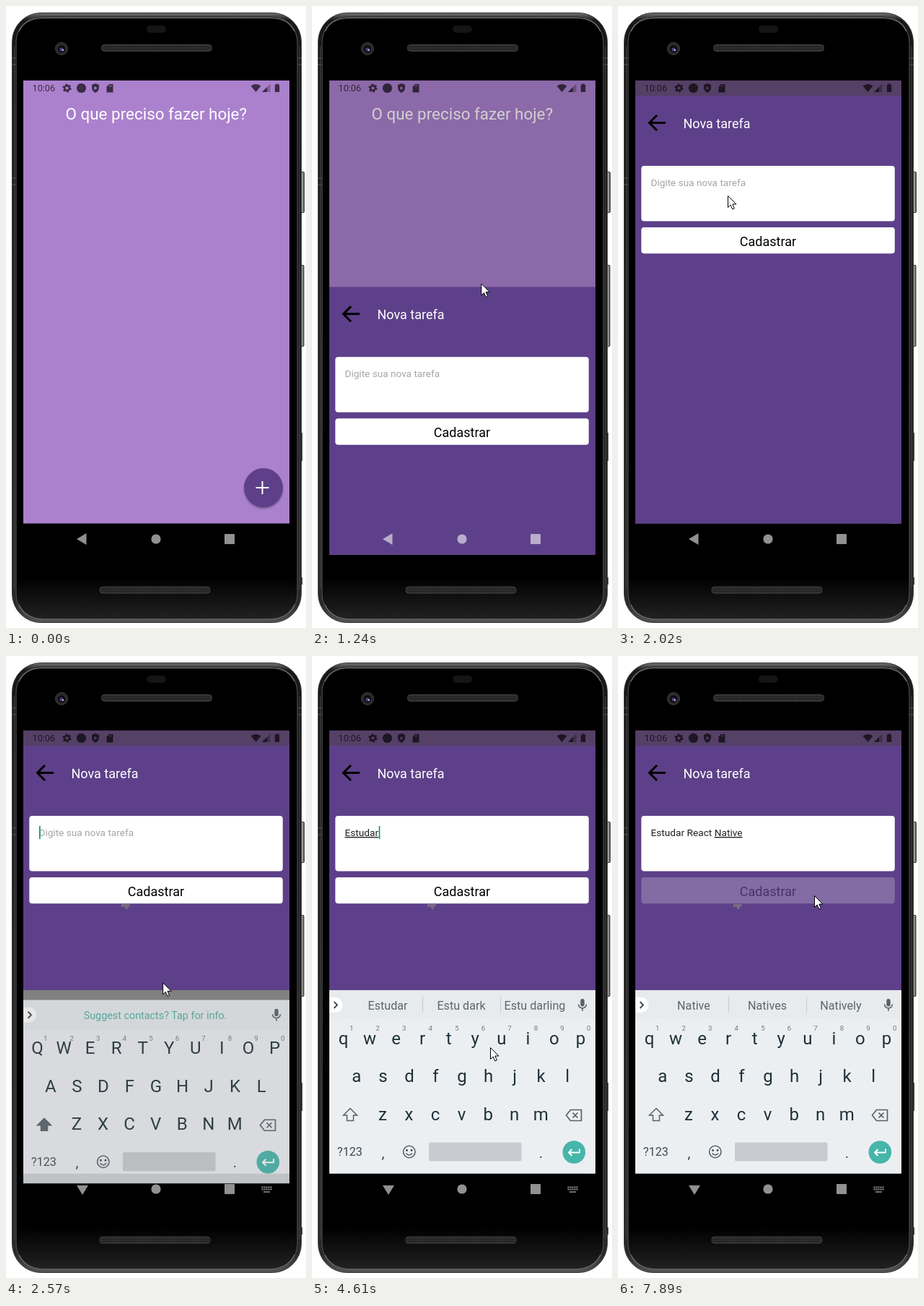
An HTML page that plays this animation: 416x860 px, repeating every 8000 ms.

```html
<!DOCTYPE html>
<html lang="pt">
<head>
<meta charset="utf-8">
<title>Lista de tarefas</title>
<style>
  html, body { margin: 0; width: 100%; height: 100%; overflow: hidden; background: #fff; }
  svg { display: block; width: 100%; height: 100%; font-family: Roboto, sans-serif; }
  text { white-space: pre; }
  .mid { text-anchor: middle; }
  .line { fill: none; stroke-linejoin: round; }
  #word { text-decoration: underline; text-decoration-thickness: 1px; }
</style>
</head>
<body>
<svg viewBox="0 0 416 860">
  <defs>
    <linearGradient id="rim" x2="0" y2="1">
      <stop offset="0" stop-color="#747474"/><stop offset=".012" stop-color="#181818"/>
      <stop offset=".5" stop-color="#202020"/><stop offset=".97" stop-color="#292929"/>
      <stop offset="1" stop-color="#555"/>
    </linearGradient>
    <linearGradient id="face" x2="0" y2="1">
      <stop offset=".93" stop-color="#000"/><stop offset="1" stop-color="#222"/>
    </linearGradient>
    <linearGradient id="key"><stop offset="0" stop-color="#444"/><stop offset=".5" stop-color="#aaa"/><stop offset="1" stop-color="#555"/></linearGradient>
    <pattern id="mesh" width="3" height="3" patternUnits="userSpaceOnUse">
      <rect width="3" height="3" fill="#222"/><circle cx="1" cy="1" r=".8" fill="#484848"/>
    </pattern>
    <filter id="soft" x="-30%" y="-30%" width="160%" height="160%"><feGaussianBlur stdDeviation="1.6"/></filter>
    <clipPath id="glass"><rect x="24" y="103" width="369" height="656"/></clipPath>
  </defs>

  <!-- phone -->
  <g stroke="#333" fill="url(#key)">
    <rect x="407.5" y="229.5" width="6" height="56" rx="1"/>
    <rect x="407.5" y="358.5" width="5.5" height="112" rx="1"/>
    <path d="M410.5 590v39M410.5 790v10"/>
  </g>
  <rect x="8.5" y="9.5" width="401" height="843" rx="40" fill="url(#rim)" stroke="#343434"/>
  <g class="line">
    <path d="M8 72h6M8 81h6M404 72h6M404 81h6M8 238h6M8 247h6M84 10v5M94 10v5M314 10v5M324 10v5M84 847v5M94 847v5M332 847v5M342 847v5" stroke="#5a5a5a"/>
    <path d="M11.5 56v750M407 56v750" stroke="#424242"/>
  </g>
  <rect x="14" y="15" width="390" height="833" rx="35" fill="url(#face)" stroke="#4a4a4a" stroke-width="1.2"/>
  <path class="line" d="M18 35Q26 17 50 16.5H368Q392 17 400 35" stroke="#8a8a8a"/>
  <path class="line" d="M18 828Q27 847 52 848H366Q391 847 400 828" stroke="#666" stroke-width="1.5"/>
  <rect x="195" y="27" width="27" height="10" rx="5" fill="#151515"/>
  <g fill="url(#mesh)" stroke="#414141">
    <rect x="132.5" y="53.5" width="153" height="9" rx="4"/>
    <rect x="130" y="803" width="153" height="9" rx="4"/>
  </g>
  <circle cx="77" cy="59" r="8.5" fill="#292929" stroke="#3c3c3c"/>
  <circle cx="77" cy="59.500" r="5" fill="#0b0713"/>
  <circle cx="77" cy="60" r="2.600" fill="#55407a"/>
  <circle cx="79" cy="61" r="1.200" fill="#c7b6ee"/>

  <g clip-path="url(#glass)">
    <!-- home -->
    <rect x="24" y="103" width="369" height="612.500" fill="#ab81ce"/>
    <text class="mid" x="208.300" y="157" font-size="22.430" fill="#fff">O que preciso fazer hoje?</text>
    <g opacity=".65">
      <text x="36.500" y="118.300" font-size="12.700">10:06</text>
      <g class="line" stroke="#000">
        <circle cx="84.500" cy="113.500" r="3.400" stroke-width="2.600"/>
        <circle cx="84.500" cy="113.500" r="5.200" stroke-width="1.800" stroke-dasharray="2.700 2.745"/>
      </g>
      <circle cx="104.500" cy="113.500" r="6.600"/>
      <path fill-rule="evenodd" d="M124 107l5 2v4q0 4.500-5 7-5-2.500-5-7v-4zM122.500 111v5l4-2.500z"/>
      <path fill-rule="evenodd" d="M143 108h5.500v11.500h-9v-8zM143 109.500v2h1v-2zM145 109.500v2h1v-2z"/>
      <path d="M339.500 110.500q7-5 14 0l-7 8.500z"/>
      <path d="M355 119l11.500-11.500v11.500z" opacity=".4"/><path d="M355 119l7-7v7z"/>
      <path d="M374.500 107.500h3v1.200h1.700v10.300h-6.400v-10.300h1.700z"/>
    </g>
    <path id="homeTrail" d="M378 708.500v7h9z" fill="#aaa3b0"/>
    <g id="fab">
      <circle cx="357" cy="668" r="26.500" opacity=".4" filter="url(#soft)"/>
      <circle cx="357" cy="666" r="27" fill="#5d4089"/>
      <path d="M346.500 666h18M355.500 657v18" stroke="#fff" stroke-width="2"/>
    </g>
    <rect id="dim" x="24" y="103" width="369" height="612.500"/>

    <!-- new task sheet -->
    <g id="sheet">
      <rect x="24" y="124" width="369" height="591.500" fill="#5d4089"/>
      <path class="line" d="M66 161.500H44M54 151L43.500 161.500L54 172" stroke="#000" stroke-width="3" style="stroke-linejoin:miter"/>
      <text x="90.500" y="168.500" font-size="18" fill="#fff">Nova tarefa</text>
      <rect x="32.300" y="221" width="351.500" height="76.500" rx="4" fill="#fff"/>
      <text id="hint" x="45.500" y="249" font-size="13.600" fill="#a5a5a5">Digite sua nova tarefa</text>
      <text id="entry" x="45.500" y="249" font-size="13.700" fill="#222"><tspan id="done"></tspan><tspan id="word"></tspan></text>
      <rect id="caret" y="235" width="1.700" height="18" fill="#16917f"/>
      <g id="save">
        <rect x="32.300" y="306" width="351.500" height="36.300" rx="4" fill="#fff"/>
        <text class="mid" x="208" y="331.500" font-size="18">Cadastrar</text>
      </g>
      <path id="sheetTrail" d="M160 343h12l-1 4-3-1 1 4h-3l-2-4-4 2z" fill="#786b83"/>
    </g>

    <!-- keyboard -->
    <rect id="gap" x="24" y="462" width="369" height="253.500" fill="#808080"/>
    <g id="board">
      <rect x="24" y="462" width="369" height="253.500" fill="#eceff2"/>
      <rect x="24" y="462" width="369" height="40" fill="#e7ebee"/>
      <path d="M24 472h8a10.500 10.500 0 0 1 0 21h-8z" fill="#fff"/>
      <path class="line" d="M30.500 478l4.500 4.500-4.500 4.500" stroke="#37474f" stroke-width="1.800"/>
      <text id="notice" class="mid" x="207" y="488" font-size="14.350" fill="#4db0a2">Suggest contacts? Tap for info.</text>
      <g id="words" class="mid" font-size="16.150" fill="#5b666b">
        <path d="M153.500 471v22M261.500 471v22" stroke="#c3c9cc"/>
        <text x="105" y="488.500"></text><text x="207" y="488.500"></text><text x="309" y="488.500"></text>
      </g>
      <rect x="372.300" y="474" width="5.400" height="10.500" rx="2.700" fill="#566268"/>
      <path class="line" d="M369.500 481.500a5.500 5.500 0 0 0 11 0M375 487v4" stroke="#566268" stroke-width="1.500"/>
      <g id="keys" class="mid" font-size="24" fill="#1f3139"></g>
      <g id="digits" class="mid" font-size="9.700" fill="#6f7a7f"></g>
      <path id="shift" d="M53 625.500l9.500 9.500h-5v7.500h-9v-7.500h-5z" stroke="#566268" stroke-width="1.500"/>
      <path class="line" d="M352.500 635l6-7.500h15v15h-15zM361.500 631.500l7 7m0-7l-7 7" stroke="#566268" stroke-width="1.700"/>
      <g fill="#3c4a50">
        <text class="mid" x="52.500" y="691.300" font-size="16.200">?123</text>
        <text class="mid" x="98.500" y="693.500" font-size="20">,</text>
        <text class="mid" x="317.500" y="693.500" font-size="20">.</text>
        <circle cx="131.500" cy="683.500" r="1.400"/><circle cx="138" cy="683.500" r="1.400"/>
      </g>
      <g class="line" stroke="#566268" stroke-width="1.600"><circle cx="134.800" cy="685.500" r="8.200"/><path d="M130.500 687.500q4.300 5 8.600 0"/></g>
      <rect x="162" y="672.500" width="128.500" height="26" rx="2" fill="#c8ccd0"/>
      <circle cx="363.300" cy="686" r="15.800" fill="#46b5aa"/>
      <path class="line" d="M371 681.500v5H356M360.500 682l-4.500 4.500 4.500 4.500" stroke="#fff" stroke-width="2"/>
    </g>

    <!-- navigation -->
    <g fill="#fff" opacity=".57">
      <path id="back" d="M98 737l13.500-8v16z"/>
      <g id="down">
        <path d="M98 732h16l-8 13z"/>
        <path d="M354.500 734.500h14M354.500 737.500h14" stroke="#fff" stroke-width="2" stroke-dasharray="2 1"/>
        <path d="M357 741h9" stroke="#fff" stroke-width="1.500"/>
      </g>
      <circle cx="208" cy="737" r="6.600"/>
      <rect x="303" y="730" width="14" height="14" rx="1"/>
    </g>
  </g>

  <path id="mouse" d="M.5 .5v16l3.700-3.500 2.500 6 2.700-1.100-2.500-5.900h5.100z" fill="#fff" stroke="#000"/>
</svg>

<script>
const LOOP = 8000;
const $ = id => document.getElementById(id);
const clamp = x => Math.min(1, Math.max(0, x));
const ramp = (t, start, length) => clamp((t - start) / length);
const show = (id, on) => { $(id).style.display = on ? '' : 'none'; };
const fade = (id, value) => $(id).setAttribute('opacity', value);
const move = (id, x, y) => $(id).setAttribute('transform', `translate(${x} ${y})`);

// Time, committed text, word being typed, suggestions
const typing = [
  [3200, '', 'E'],
  [3520, '', 'Es'],
  [3820, '', 'Est'],
  [4140, '', 'Estu', 'Estu,Estuary,Estudio'],
  [4290, '', 'Estud', 'Estud,Estudio,Estudios'],
  [4530, '', 'Estuda', 'Estuda,Estudar,Estu day'],
  [4610, '', 'Estudar', 'Estudar,Estu dark,Estu darling'],
  [4750, 'Estudar ', '', 'the,to,and'],
  [4990, 'Estudar ', 'R', 'R,Re,Run'],
  [5230, 'Estudar ', 'Re', 'Re,Real,Ready'],
  [5460, 'Estudar ', 'Rea', 'Rea,Real,Ready'],
  [5610, 'Estudar ', 'Reac', 'Reac,React,Reached'],
  [5830, 'Estudar ', 'React', 'React,Reacts,Reaction'],
  [6070, 'Estudar React ', '', 'the,to,and'],
  [6380, 'Estudar React ', 'N', 'N,Not,Need'],
  [6620, 'Estudar React ', 'Na', 'Na,Name,Nature'],
  [6700, 'Estudar React ', 'Nat', 'Nat,Nature,Natural'],
  [6790, 'Estudar React ', 'Nati', 'Nati,Native,Nation'],
  [6950, 'Estudar React ', 'Nativ', 'Nativ,Native,Natives'],
  [7030, 'Estudar React ', 'Native', 'Native,Natives,Natively']
];

// Time, x, y
const path = [
  [0, 388, 870], [70, 386, 846], [390, 378, 708], [550, 352, 645], [710, 351, 660],
  [1000, 351, 660], [1160, 286, 462], [1320, 184, 307], [1640, 152, 262],
  [2200, 152, 262], [2410, 160, 331], [2570, 217, 451], [2810, 247, 541],
  [7270, 247, 541], [7500, 258, 440], [7730, 272, 331], [LOOP, 272, 331]
];

const svgText = (parent, x, y, label) => {
  const node = document.createElementNS(parent.namespaceURI, 'text');
  node.setAttribute('x', x);
  node.setAttribute('y', y);
  node.textContent = label;
  parent.append(node);
  return node;
};
const keys = [];
['qwertyuiop', 'asdfghjkl', 'zxcvbnm'].forEach((row, r) => [...row].forEach((letter, i) => {
  const x = [43.5, 61.8, 98][r] + i * 36.55;
  keys.push([svgText($('keys'), x, 536.5 + r * 52.6, letter), letter]);
  if (!r) svgText($('digits'), x + 11.2, 518.3, (i + 1) % 10);
}));
const wordSlots = $('words').querySelectorAll('text');

function mouseAt(t) {
  const i = path.findIndex(p => p[0] > t);
  const [a, b] = [path[i - 1], path[i]];
  const p = (t - a[0]) / (b[0] - a[0]);
  return [a[1] + (b[1] - a[1]) * p, a[2] + (b[2] - a[2]) * p];
}

function drawEntry(t) {
  const [time, done, word, list] = typing.filter(e => e[0] <= t).pop() || [2200, '', ''];
  $('done').textContent = done;
  $('word').textContent = word;
  show('hint', !(done + word));
  show('caret', t >= time && (t - time) % 1000 < 500);
  $('caret').setAttribute('x', 46 + (done + word ? $('entry').getComputedTextLength() : 0));
  show('notice', !list);
  show('words', list);
  (list || ',,').split(',').forEach((label, i) => { wordSlots[i].textContent = label; });
}

function draw(t) {
  const open = ramp(t, 1165, 300);
  const rise = ramp(t, 2460, 300);
  const upper = t < 3280;

  move('mouse', ...mouseAt(t));
  fade('fab', 1 - .8 * ramp(t, 900, 150));
  fade('dim', .5 * ramp(t, 1165, 205));
  show('homeTrail', t >= 450);
  show('sheet', open > 0);
  move('sheet', 0, 635 * (1 - open) ** 3);
  show('sheetTrail', t >= 2450);
  fade('save', t >= 7890 ? .23 : 1);

  show('gap', rise > 0);
  show('board', rise > 0);
  move('board', 0, 55 * (1 - rise) ** 3);
  fade('board', Math.min(1, rise * 2.2));
  show('back', !rise);
  show('down', rise > 0);
  $('shift').setAttribute('fill', upper ? '#566268' : 'none');
  for (const [node, letter] of keys) node.textContent = upper ? letter.toUpperCase() : letter;
  drawEntry(t);
}

const begin = performance.now();
function tick() {
  draw((performance.now() - begin) % LOOP);
  requestAnimationFrame(tick);
}
tick();
</script>
</body>
</html>
```
